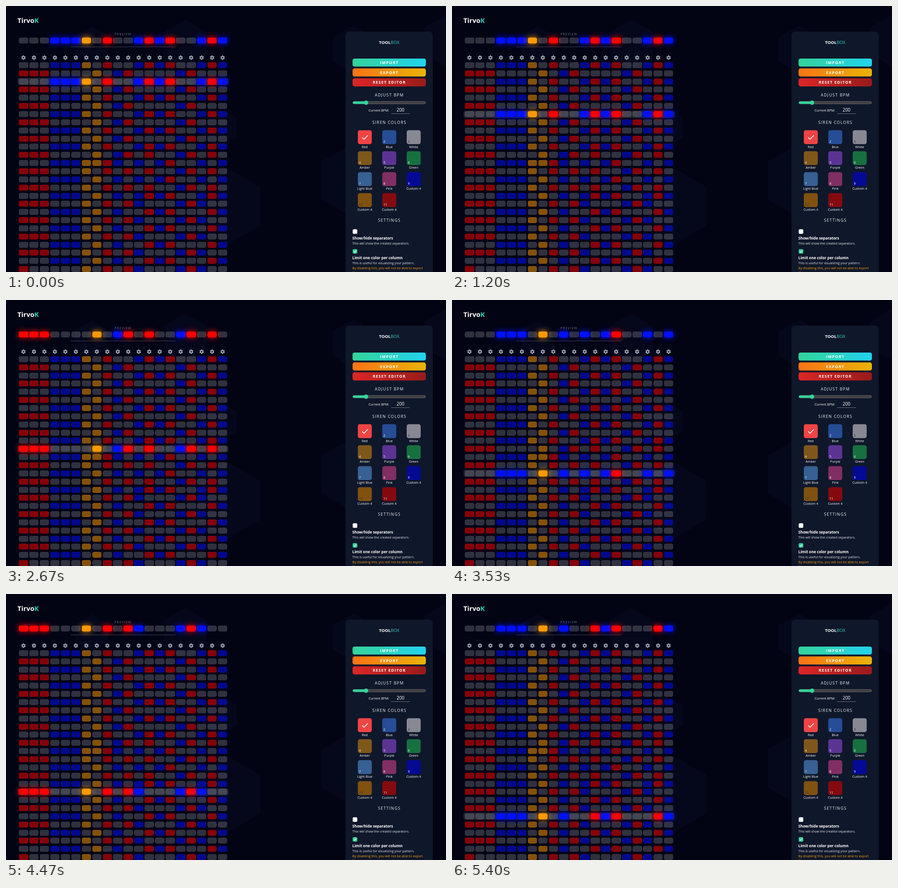
Animation of 963x582 px, one loop 5.47 s. Source, as an HTML page:

```html
<!DOCTYPE html>
<html lang="en">
<head>
<meta charset="utf-8">
<title>Light pattern editor</title>
<style>
  html, body { margin: 0; width: 100%; height: 100%; overflow: hidden; background: #020414; }
  #stage { position: relative; width: 963px; height: 582px; overflow: hidden; background: #020414; }
  svg { position: absolute; left: 0; top: 0; }
  text { font-family: "Open Sans", "Noto Sans", sans-serif; fill: #fff; }
  .mid { text-anchor: middle; }
  .head { font-size: 8.5px; letter-spacing: 1.4px; fill: #f1f5f9; font-weight: 500; }
  .btn { font-size: 8.4px; letter-spacing: 1.3px; font-weight: 700; }
  .name { font-size: 8.2px; font-weight: 700; }
  .note { font-size: 7.15px; fill: #e2e8f0; }
  .label { font-size: 7.2px; font-weight: 500; }
  .row { position: absolute; left: 25px; width: 462px; height: 16px; border-radius: 5px; }
  .row i { position: absolute; top: 1.5px; width: 20.5px; height: 13px; border-radius: 4px; background: rgba(255,255,255,.18); }
  .row i.on { background: var(--c); opacity: .52; }
  .lit { z-index: 1; }
  .lit.bar { background: rgba(255,255,255,.1); }
  .lit i.on { opacity: 1; box-shadow: 0 0 13px var(--c); }
</style>
</head>
<body>
<div id="stage">
  <svg id="art" width="963" height="582" viewBox="0 0 963 582">
    <defs>
      <linearGradient id="import"><stop stop-color="#34d399"/><stop offset="1" stop-color="#22d3ee"/></linearGradient>
      <linearGradient id="export"><stop stop-color="#f97316"/><stop offset="1" stop-color="#eab308"/></linearGradient>
      <linearGradient id="reset"><stop stop-color="#dc2626"/><stop offset="1" stop-color="#991b1b"/></linearGradient>
      <g id="gear" fill="none" stroke="#9ca3af" stroke-width="2.2">
        <circle r="2.7"/>
        <path id="tooth" d="M0-3V-4.9M0 3V4.9"/>
        <use href="#tooth" transform="rotate(60)"/>
        <use href="#tooth" transform="rotate(120)"/>
      </g>
    </defs>
    <g id="hexes" fill="#1e2950" fill-opacity=".13"></g>

    <text x="25" y="37" font-size="14.7" font-weight="700">Tirvo<tspan fill="#2dd4bf">K</tspan></text>
    <text class="mid" x="256" y="64.3" font-size="7.1" letter-spacing="1.2" style="fill:#6b7280">PREVIEW</text>
    <path d="M141 89.5H371" stroke="#3c3f4c"/>
    <g id="gears"></g>

    <rect x="743" y="56" width="191" height="540" rx="8" fill="#0f172a"/>
    <text class="mid" x="838.5" y="82.8" font-size="9.5" font-weight="700">TOOL<tspan font-weight="400" fill="#2dd4bf">BOX</tspan></text>

    <rect x="758.5" y="115" width="160.5" height="17.6" rx="4.5" fill="url(#import)"/>
    <rect x="758.5" y="136.6" width="160.5" height="17.6" rx="4.5" fill="url(#export)"/>
    <rect x="758.5" y="158.3" width="160.5" height="17.6" rx="4.5" fill="url(#reset)"/>
    <text class="mid btn" x="839" y="126.9">IMPORT</text>
    <text class="mid btn" x="839" y="148.5">EXPORT</text>
    <text class="mid btn" x="839" y="170.2">RESET EDITOR</text>

    <text class="mid head" x="839.2" y="198.2">ADJUST BPM</text>
    <rect x="759.5" y="209" width="158.5" height="5" rx="2.5" fill="#3b3b3b" stroke="#858585" stroke-width=".8"/>
    <rect x="759" y="208.7" width="30" height="5.6" rx="2.8" fill="#34d399"/>
    <circle cx="788" cy="211.6" r="4.8" fill="#34d399"/>
    <text class="label" x="793.5" y="230.6">Current BPM:</text>
    <text class="mid" x="863.5" y="231.3" font-size="10" font-weight="500">200</text>
    <path d="M843 235.5H884" stroke="#6b7280"/>

    <text class="mid head" x="839.2" y="258.2">SIREN COLORS</text>
    <g id="swatches"></g>
    <path d="M779.5 287.5l4 4 8.5-8.5" fill="none" stroke="#fff" stroke-width="1.7"/>

    <text class="mid head" x="839.2" y="472.3">SETTINGS</text>
    <rect x="758.8" y="488.6" width="10" height="9.8" rx="2.5" fill="#fff"/>
    <text class="name" x="758" y="510.8">Show/hide separators</text>
    <text class="note" x="758" y="521.7">This will show the created separators.</text>
    <rect x="758.8" y="532" width="10" height="9.8" rx="2.5" fill="#34d399"/>
    <path d="M761.3 537.1l1.8 1.8 3.4-3.7" fill="none" stroke="#fff" stroke-width="1.2"/>
    <text class="name" x="758" y="554">Limit one color per column</text>
    <text class="note" x="758" y="564.9">This is useful for visualizing your pattern.</text>
    <text class="note" x="758" y="575.7" style="fill:#f59e0b">By disabling this, you will not be able to export</text>
    <text class="note" x="758" y="586.4" style="fill:#f59e0b">files.</text>
  </svg>
</div>
<script>
const stage = document.getElementById('stage');
const fill = (id, markup) => { document.getElementById(id).innerHTML = markup; };

// Faint hexagons: centre x, centre y, radius
const hexes = [[187, 86, 41], [392, 85, 55], [468, 266, 43], [484, 438, 84],
               [760, 95, 52], [763, 382, 83], [963, 76, 56]];
fill('hexes', hexes.map(([x, y, r]) => {
  const w = r * .866, h = r / 2;
  return `<path d="M${x} ${y - r}l${w} ${h}v${r}l${-w} ${h}l${-w} ${-h}v${-r}z"/>`;
}).join(''));

// Colour palette
const swatches = [
  ['Red', '#ef4444'], ['Blue', '#264d95'], ['White', '#888893'],
  ['Amber', '#80571b'], ['Purple', '#5b3493'], ['Green', '#17703f'],
  ['Light Blue', '#376093'], ['Pink', '#802e63'], ['Custom 4', '#050a94'],
  ['Custom 4', '#80510f'], ['Custom 4', '#850a10']
];
fill('swatches', swatches.map(([name, color], i) => {
  const x = 770 + (i % 3) * 53.5, y = 271.8 + Math.floor(i / 3) * 45.9;
  const ink = i === 2 || i === 9 ? '#33302f' : '#fff';
  const num = i ? `<text class="label" x="${x + 2.4}" y="${y + 27}" style="fill:${ink}">${i + 1}</text>` : '';
  return `<rect x="${x}" y="${y}" width="30.6" height="30.4" rx="4.5" fill="${color}"/>${num}` +
         `<text class="mid label" x="${x + 15.3}" y="${y + 38.7}">${name}</text>`;
}).join(''));

// Light pattern: each column alternates, and shifts phase at a few rows
const COLS = 20, ROWS = 26, PITCH_X = 22.94, PITCH_Y = 17.85;
const hue = { R: '#ff0000', B: '#0010ff', A: '#ff9900' };
const colors = 'RRRBBBAARBRBRBRBRBRB';
const phase = '11100001011000011000';
const shifts = { 6: [13], 7: [12], 8: [13], 9: [12], 11: [17], 12: [11, 16], 17: [17], 18: [11, 16] };

function isOn(r, c) {
  if (r === ROWS - 1 && (c === 1 || c === 2)) return false;
  const shifted = (shifts[c] || []).filter(s => r >= s).length;
  return (r + shifted) % 2 === +phase[c];
}

function addRow(centerY) {
  const row = document.createElement('div');
  row.className = 'row';
  row.style.top = centerY - 8 + 'px';
  for (let c = 0; c < COLS; c++) {
    const cell = document.createElement('i');
    cell.style.left = 3 + c * PITCH_X + 'px';
    cell.style.setProperty('--c', hue[colors[c]]);
    row.append(cell);
  }
  stage.append(row);
  return row;
}

function paint(row, r) {
  [...row.children].forEach((cell, c) => cell.classList.toggle('on', isOn(r, c)));
}

fill('gears', Array.from({ length: COLS }, (_, c) =>
  `<use href="#gear" x="${38.2 + c * PITCH_X}" y="113"/>`).join(''));

const preview = addRow(75.2);
preview.classList.add('lit');
const rows = Array.from({ length: ROWS }, (_, r) => {
  const row = addRow(129.4 + r * PITCH_Y);
  paint(row, r);
  return row;
});

// Playback
const LOOP = 5470, FIRST_ROW = 2;
const beats = [0, 270, 600, 870, 1200, 1470, 1730, 2070, 2400, 2670,
               3000, 3270, 3530, 3870, 4130, 4470, 4800, 5070, 5400];
const start = performance.now();
let current = -1;

function tick() {
  const t = (performance.now() - start) % LOOP;
  const active = FIRST_ROW + beats.filter(b => b <= t).length - 1;
  if (active !== current) {
    current = active;
    paint(preview, active);
    rows.forEach((row, r) => {
      row.classList.toggle('lit', r === active);
      row.classList.toggle('bar', r === active);
    });
  }
  requestAnimationFrame(tick);
}
tick();
</script>
</body>
</html>
```
